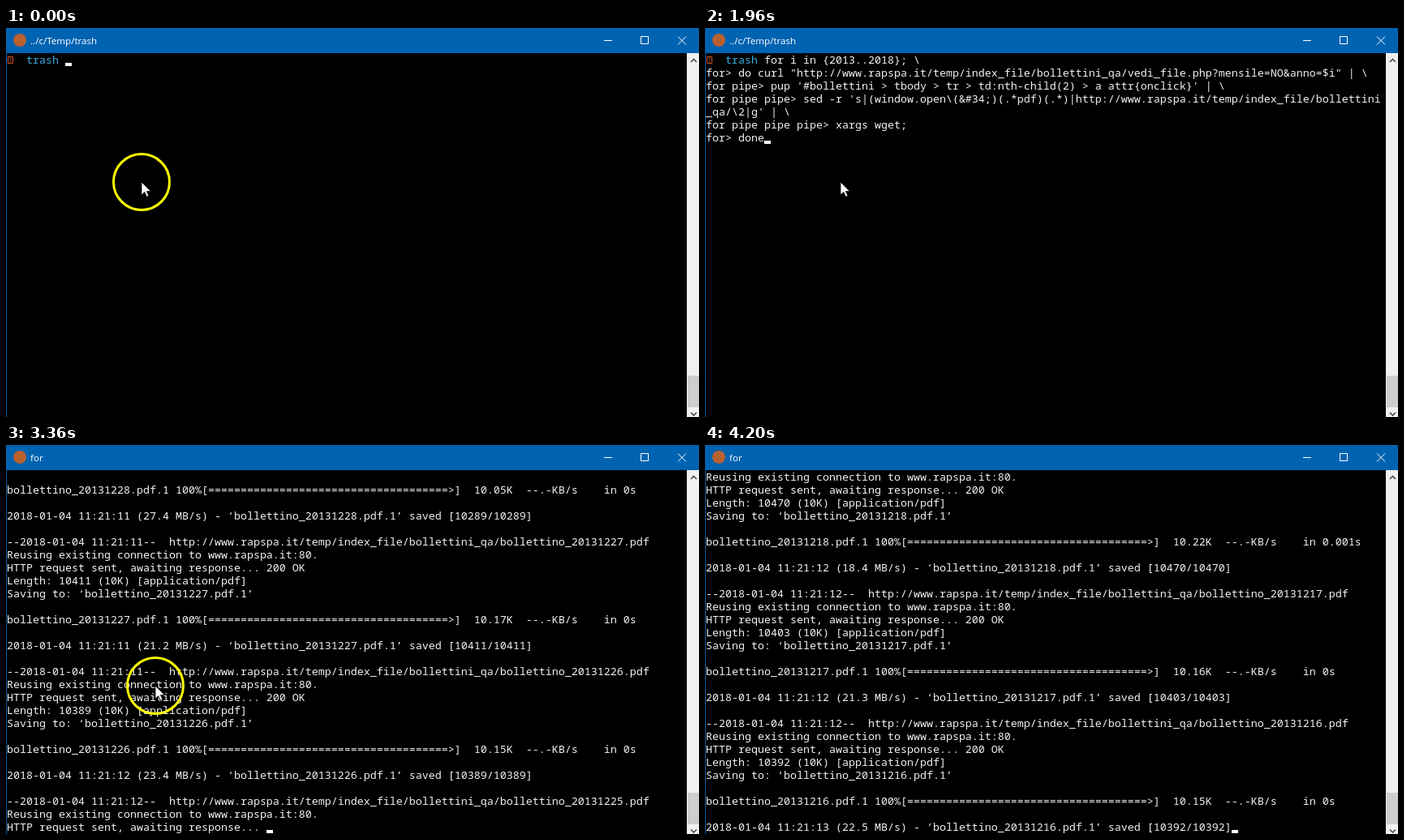
These frames come from a looping animation (854 px wide and 480 px high, 4300 ms). An HTML page:

```html
<!DOCTYPE html>
<html lang="en">
<head>
<meta charset="utf-8">
<title>Terminal</title>
<style>
  html, body { margin: 0; width: 100%; height: 100%; overflow: hidden; background: #000; }
  #stage { position: relative; width: 854px; height: 480px; overflow: hidden; background: #000; }
  #stage > * { position: absolute; }
  #bar { left: 0; top: 0; width: 854px; height: 31px; background: #0063b1; }
  #edge { left: 0; top: 31px; width: 1px; height: 449px; background: #0063b1; }
  #title { left: 30px; top: 7px; font: 11.6px/17px "Open Sans", "Noto Sans", sans-serif; color: #fff; white-space: pre; }
  #scroll { left: 839px; top: 31px; width: 15px; height: 449px; background: #f0f0f0; }
  #thumb { left: 840px; top: 429px; width: 14px; height: 39px; background: #cdcdcd; }
  #text, #dir {
    left: 1px; top: 31px; margin: 0; white-space: pre; color: #f2f2f2;
    font: 13.3333px/16px "Noto Sans Mono", "DejaVu Sans Mono", monospace;
    font-variant-ligatures: none;
  }
  #dir { color: #3aa9e0; }
  #caret { width: 8px; height: 4px; background: #fff; }
  #icons, #pointer { left: 0; top: 0; overflow: visible; }
</style>
</head>
<body>
<div id="stage">
  <pre id="text"></pre>
  <div id="dir">   trash</div>
  <div id="caret"></div>
  <div id="bar"></div>
  <div id="edge"></div>
  <div id="title"></div>
  <div id="scroll"></div>
  <div id="thumb"></div>
  <svg id="icons" width="854" height="480" fill="none">
    <circle cx="17" cy="15" r="8" fill="#b9602f"/>
    <path d="M737 15.5h10M782.5 10.5h9v9h-9zM828 10.5l10 10M838 10.5l-10 10" stroke="#fff"/>
    <path d="M844 42l3.5-3.5L851 42M844 474.500l3.5 3.5 3.500-3.500" stroke="#505050" stroke-width="1.7"/>
    <g id="glyph" stroke="#c4532a">
      <path d="M2.500 35.500h6v8h-6z"/>
      <path d="M4.300 38q.2-1 1.200-1t1.200 1-1.200 1.600v.8M5.500 41.300v1" stroke-width=".9"/>
    </g>
  </svg>
  <svg id="pointer" width="1" height="1">
    <circle id="ring" r="34.500" fill="none" stroke="#ffff00" stroke-width="3"/>
    <path d="M0 0V16L3.800 12.600 6.400 18.300 9 17.200 6.500 11.600H11.500Z" fill="#fff" stroke="#000" stroke-width=".8"/>
  </svg>
</div>
<script>
const LOOP = 4300, TICK = 140, ROWS = 28, CELL = 8, LINE = 16;
const $ = id => document.getElementById(id);
const host = "www.rapspa.it";
const base = `http://${host}/temp/index_file/bollettini`;
const clock = "--:--:--";

const curlRow = (pct, total, got, rate, now) =>
  [pct.padStart(3), total.padStart(5), "   0", got.padStart(5), "   0", "    0",
   rate.padStart(6), "     0", clock, clock, clock, now.padStart(5)].join(" ");

const commands = [
  " ".repeat(9) + "for i in {2013..2018}; \\",
  `for> do curl "${base}_qa/vedi_file.php?mensile=NO&anno=$i" | \\`,
  "for pipe> pup '#bollettini > tbody > tr > td:nth-child(2) > a attr{onclick}' | \\",
  `for pipe pipe> sed -r 's|(window.open\\(&#34;)(.*pdf)(.*)|${base}`,
  "_qa/\\2|g' | \\",
  "for pipe pipe pipe> xargs wget;",
  "for> done",
  "  % Total    % Received % Xferd  Average Speed   Time    Time     Time  Current",
  " ".repeat(33) + "Dload  Upload   Total   Spent    Left  Speed"
];

// One download per day, going back from the 31st: size, MB/s, seconds
const downloads = [
  [10351, "17.8", "0.001"], [10278, "14.1", "0.001"], [10312, "22.7", "0"],
  [10289, "27.4", "0"], [10411, "21.2", "0"], [10389, "23.4", "0"],
  [10393, "5.68", "0.002"], [10413, "20.3", "0"], [10395, "26.0", "0"],
  [10407, "24.1", "0"], [10384, "19.6", "0"], [10421, "22.3", "0"],
  [10436, "20.9", "0"], [10470, "18.4", "0.001"], [10403, "21.3", "0"],
  [10392, "22.5", "0"]
];

function wgetLines([size, speed, secs], i) {
  const day = 31 - i, file = `bollettino_201312${day}.pdf`;
  const begin = `2018-01-04 11:21:${day > 25 ? 11 : 12}`;
  const end = `2018-01-04 11:21:${day > 26 ? 11 : day > 16 ? 12 : 13}`;
  const connect = i
    ? [`Reusing existing connection to ${host}:80.`]
    : [`Resolving ${host} (${host})... 94.23.64.40`,
       `Connecting to ${host} (${host})|94.23.64.40|:80... connected.`];
  return [
    `--${begin}--  ${base}_qa/${file}`,
    ...connect,
    "HTTP request sent, awaiting response... 200 OK",
    `Length: ${size} (10K) [application/pdf]`,
    `Saving to: ‘${file}.1’`,
    "",
    `${file}.1 100%[${"=".repeat(37)}>]  ${(size / 1024).toFixed(2)}K  --.-KB/s    in ${secs}s`,
    "",
    `${end} (${speed} MB/s) - ‘${file}.1’ saved [${size}/${size}]`,
    ""
  ];
}

const progress = [
  [2660, curlRow("100", "54162", "54162", "155k", "155k")],
  [2520, curlRow("100", "3616", "3616", "15869", "15859")],
  [0, curlRow("0", "0", "0", "0", "0")]
];
const output = downloads.flatMap(wgetLines);

// Time, number of lines, visible columns of the last line
const steps = [
  [0, 1, 9], [140, 1, 24], [280, 2, 14], [420, 2, 50], [560, 2, 80],
  [700, 3, 10], [840, 3, 45], [980, 4, 30], [1120, 4], [1400, 7],
  [2240, 10], [2800, 12, 43], [2940, 34, 40], [3080, 44, 40], [3220, 64, 40],
  [3360, 74, 40], [3500, 84, 40], [3640, 104, 40], [3780, 124, 40],
  [3920, 134, 40], [4060, 154, 40], [4200, 170]
];

// Time, x, y
const path = [
  [0, 167, 190], [2660, 167, 190], [2940, 175, 245], [3220, 183, 289],
  [3360, 184, 297], [3640, 158, 447], [3780, 150, 530], [LOOP, 150, 530]
];

function pointerAt(t) {
  const k = path.findIndex(p => p[0] > t);
  const [t0, x0, y0] = path[k - 1], [t1, x1, y1] = path[k];
  const u = (t - t0) / (t1 - t0);
  return [x0 + (x1 - x0) * u, y0 + (y1 - y0) * u];
}

function draw(t) {
  const [, count, cols] = steps.findLast(s => s[0] <= t);
  const row = progress.find(p => p[0] <= t)[1];
  const lines = [...commands, row, ...output].slice(0, count);
  const last = lines[count - 1].slice(0, cols);
  lines[count - 1] = last;

  const top = Math.max(0, count - ROWS);
  $("text").textContent = lines.slice(top).join("\n");
  $("dir").style.display = $("glyph").style.display = top ? "none" : "";
  $("title").textContent = t < 2240 ? "../c/Temp/trash" : "for";

  const caret = $("caret").style;
  caret.left = 1 + last.length * CELL + "px";
  caret.top = 43 + (count - 1 - top) * LINE + "px";
  caret.visibility = t >= 1400 && t < 1960 ? "hidden" : "visible";

  const [x, y] = pointerAt(Math.floor(t / TICK) * TICK);
  $("pointer").style.transform = `translate(${x}px, ${y}px)`;
  $("ring").style.display = t < 1400 || t >= 2660 ? "" : "none";
}

const start = performance.now();
function frame() {
  draw((performance.now() - start) % LOOP);
  requestAnimationFrame(frame);
}
frame();
</script>
</body>
</html>
```
